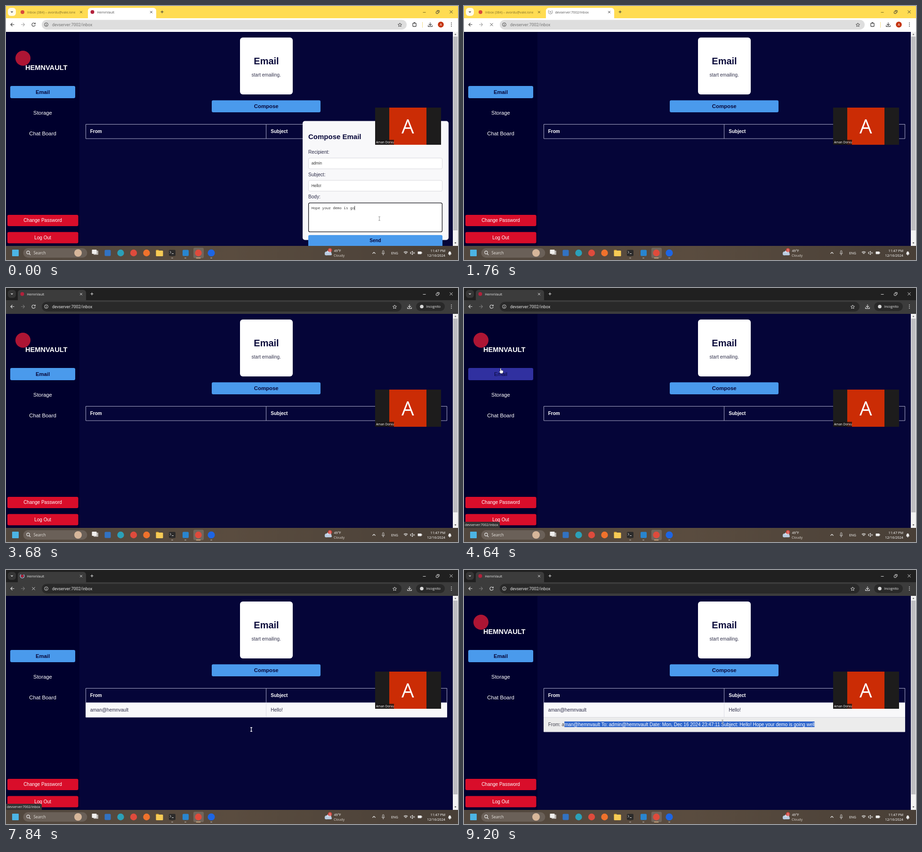
An HTML page with a canvas that plays this animation: 960x540 px, repeating every 9360 ms.

```html
<!DOCTYPE html>
<html lang="en">
<head>
<meta charset="utf-8">
<title>Webmail demo</title>
<style>
html, body { margin: 0; width: 100%; height: 100%; overflow: hidden; background: #050538; }
canvas { display: block; }
</style>
</head>
<body>
<canvas id="stage" width="960" height="540"></canvas>
<script>
const ctx = document.getElementById('stage').getContext('2d');
const LOOP = 9360, STEP = 80;
const SANS = '"Liberation Sans", sans-serif';
const UI = '"Open Sans", sans-serif';
const URL_FONT = 'Roboto, sans-serif';
const MONO = '"Noto Sans Mono", monospace';
const NAVY = '#050538', INK = '#08083a', BLUE = '#4a9aec', RED = '#d90d2a', PAPER = '#f8f8fa';
const ADDRESS = 'devserver:7002/inbox', BRAND = 'HemnVault', USER = 'Aman Dorvu';
const BODY = 'Hope your demo is going well ';
const MAIL = 'From: aman@hemnvault To: admin@hemnvault Date: Mon, Dec 16 2024 23:47:11 Subject: Hello! ' + BODY.trim();

// Moments of the hard changes, in ms
const SENT = 1280, SWITCH = 3520, HOVER = 4080, RELOAD = 4720, ROW = 4800, LOADED = 8000, OPEN = 8000;

// time, x, y, pointer shape from that time on
const POINTER = [
  [0, 793, 452, 'beam'], [320, 793, 452, ''], [800, 787, 496, 'hand'], [880, 788, 499, 'hand'],
  [SENT, 788, 499, ''], [3760, 420, 330, 'arrow'], [HOVER, 79, 186, 'hand'], [4320, 79, 186, 'hand'],
  [4400, 79, 176, 'hand'], [5440, 79, 176, 'arrow'], [5760, 691, 419, 'arrow'], [6240, 691, 419, 'arrow'],
  [6400, 297, 292, 'arrow'], [6960, 297, 292, 'arrow'], [7040, 430, 358, 'arrow'], [7200, 430, 358, 'arrow'],
  [7440, 521, 339, 'beam'], [7920, 521, 339, 'beam'], [8160, 213, 328, 'beam'], [8240, 213, 328, 'beam'],
  [8640, 760, 336, 'beam'], [8800, 760, 336, 'beam'], [9120, 549, 323, 'beam'], [LOOP, 549, 323, 'beam']
];

function box(x, y, w, h, fill, r = 0, line, width = 1) {
  ctx.beginPath();
  ctx.roundRect(x, y, w, h, r);
  if (fill) { ctx.fillStyle = fill; ctx.fill(); }
  if (line) { ctx.strokeStyle = line; ctx.lineWidth = width; ctx.stroke(); }
}
function dot(x, y, r, fill) { box(x - r, y - r, 2 * r, 2 * r, fill, r); }
function ring(x, y, r, color, width = 1) { box(x - r, y - r, 2 * r, 2 * r, null, r, color, width); }
function text(s, x, y, size, color, { bold = false, align = 'left', font = SANS } = {}) {
  ctx.font = `${bold ? 'bold ' : ''}${size}px ${font}`;
  ctx.textAlign = align;
  ctx.fillStyle = color;
  ctx.fillText(s, x, y);
  return ctx.measureText(s).width;
}
function label(s, x, y, size, color, bold) { text(s, x, y, size, color, { bold, align: 'center' }); }
function line(d, color, width = 1, x = 0, y = 0) {
  ctx.save();
  ctx.translate(x, y);
  ctx.strokeStyle = color;
  ctx.lineWidth = width;
  ctx.stroke(new Path2D(d));
  ctx.restore();
}
function shape(d, fill, outline, x, y) {
  ctx.save();
  ctx.translate(x, y);
  ctx.fillStyle = fill;
  ctx.strokeStyle = outline;
  ctx.lineWidth = 1;
  const p = new Path2D(d);
  ctx.stroke(p);
  ctx.fill(p);
  ctx.restore();
}
function cross(x, y, r, color) {
  line(`M${-r} ${-r}L${r} ${r}M${r} ${-r}L${-r} ${r}`, color, 1, x, y);
}

function spinner(x, y, color) {
  ctx.beginPath();
  ctx.arc(x, y, 4.3, -0.8, 4);
  ctx.strokeStyle = color;
  ctx.lineWidth = 1.2;
  ctx.stroke();
}

function tabs(dark, loading) {
  const ink = dark ? '#e6e6e6' : '#333', bar = dark ? '#3c3c3c' : '#fff';
  box(0, 0, 960, 27, dark ? '#202020' : '#ffdc52');
  box(4, 4, 17, 17, dark ? '#363636' : '#fffbea', 6);
  line('M-2 -1L0 1L2 -1', ink, 1.2, 12.5, 12.5);
  const left = dark ? 25 : 174, right = dark ? 170 : 319;
  box(left, 4, right - left, 26, bar, [6, 6, 0, 0]);
  if (!dark) {
    dot(35, 13, 4, '#d94a3c');
    text('Inbox (384) – avordu@vale.ione', 45, 15.7, 7.1, '#80702c', { font: UI });
    box(147, 5, 8, 18, '#ffdc52');
    cross(159.5, 13, 2.3, '#5c5020');
  }
  const icon = left + 9.5;
  if (loading && !dark) { spinner(icon, 12.5, '#999'); dot(icon, 12.5, 2, '#bbb'); }
  else dot(icon, 12.8, loading ? 2.8 : 4, '#b2213b');
  if (loading && dark) spinner(icon, 12.8, '#b9d0f6');
  text(loading && !dark ? ADDRESS : BRAND, left + 19.5, 15.7, 7.1, dark ? ink : '#555', { font: UI });
  cross(right - 10.5, 13, 2.3, ink);
  line('M-3 0H3M0 -3V3', ink, 1, right + 12.5, 12.5);
  line('M885.5 13.5H891.5', dark ? '#ddd' : '#796920');
  box(913.5, 11.5, 4.5, 4.5, null, 1, ink);
  line('M915 9.5H920V14', ink);
  cross(945.5, 12.5, 3, ink);
}

function toolbar(dark, loading) {
  const ink = dark ? '#d8d8d8' : '#444', faint = dark ? '#777' : '#aaa';
  box(0, 26, 960, 29, dark ? '#3c3c3c' : '#fff');
  box(76, 29.5, dark ? 764 : 775, 20.5, dark ? '#292929' : '#dedede', 10);
  line('M4 0H-3.5M0 -3.5L-3.5 0L0 3.5', ink, 1.2, 13.5, 39.5);
  line('M-4 0H3.5M0 -3.5L3.5 0L0 3.5', faint, 1.2, 36, 39.5);
  if (loading) cross(58.5, 39.5, 3, ink);
  else line('M3 -2A3.6 3.6 0 1 0 3.6 .8M3.7 -4V-1.5H1', ink, 1.2, 58.5, 39.5);
  ring(85.5, 39.5, 3.8, ink);
  line('M0 -.5V2.4M0 -2.2V-1.2', ink, 1, 85.5, 39.5);
  text(ADDRESS, 98, 43, 8.9, dark ? '#e4e4e4' : '#757575', { font: URL_FONT });
  line('M0 -4L1.2 -1.3L4 -1L1.9 .9L2.5 3.7L0 2.2L-2.5 3.7L-1.9 .9L-4 -1L-1.2 -1.3Z', ink, 1, dark ? 825.5 : 836.5, 40);
  line('M0 -4.5V1.5M-3 -1.2L0 1.8L3 -1.2M-4.3 1.5V4.2H4.3V1.5', ink, 1.2, dark ? 857 : 901, 39.5);
  if (dark) {
    box(871, 30, 61, 19, '#292929', 9.5);
    dot(883, 39.5, 3.8, '#d8d8d8');
    text('Incognito', 892.5, 42.2, 7, '#eee', { font: UI });
  } else {
    box(864, 36.5, 7, 7, null, 1, ink, 1.3);
    box(866, 34.5, 3, 2, ink, 1);
    line('M884.5 34V46', '#f2dc88');
    dot(923.5, 39.5, 6.2, '#c4320b');
    label('A', 923.5, 42, 7, '#fff');
  }
  for (const y of [36, 39.5, 43]) dot(946, y, 0.9, ink);
}

function sidebar(t, loading) {
  box(0, 55, 156, 455, '#00002d');
  if (!loading) {
    dot(36, 111, 16, '#ad1534');
    text(BRAND.toUpperCase(), 41, 135.5, 14.6, '#fff', { bold: true });
  }
  const hovered = t >= HOVER && t < ROW;
  box(9, 170, 138, 26, hovered ? '#3030a0' : BLUE, 3);
  label('Email', 78, 186.5, 11.3, INK, !hovered);
  label('Storage', 78, 230.5, 11.4, '#fff');
  label('Chat Board', 78, 275, 11.4, '#fff');
  box(3, 444, 150.5, 24, RED, 3);
  label('Change Password', 78, 459.3, 10, '#fff');
  box(3, 480.5, 150.5, 24, RED, 3);
  label('Log Out', 78, 496, 10, '#fff');
}

function tableRow(y, fill, border) {
  box(169.5, y + 0.5, 767, 30.5, fill, 0, border);
}

function openedMail(t, pointerX) {
  tableRow(313, '#ececec', '#dcdce0');
  const x = 178.7, y = 331.5;
  const width = text(MAIL, x, y, 10, '#40404e');
  const from = x + ctx.measureText('From: a').width, end = x + width;
  const to = t >= 8640 ? end : Math.min(end, pointerX);
  if (t <= 8240 || to <= from) return;
  ctx.save();
  ctx.beginPath();
  ctx.rect(from, 322, to - from, 12);
  ctx.clip();
  box(from, 322, to - from, 12, '#2f66cc');
  text(MAIL, x, y, 10, '#fff');
  ctx.restore();
}

function page(t, pointerX) {
  box(156, 55, 793, 455, NAVY);
  box(497, 67, 112, 121, '#fff', 6);
  label('Email', 553, 123.7, 20, INK, true);
  label('start emailing.', 552.7, 150.3, 10, '#34344e');
  box(437, 200.5, 231, 25.5, BLUE, 3);
  label('Compose', 552.7, 216.5, 11.4, INK, true);
  tableRow(251, null, '#a9a9c8');
  text('From', 178.7, 269.8, 10, '#fff', { bold: true });
  text('Subject', 562.3, 269.8, 10, '#fff', { bold: true });
  if (t >= ROW) {
    tableRow(282, PAPER, '#e6e6ee');
    text('aman@hemnvault', 178.7, 300.5, 10, '#2c2c48');
    text('Hello!', 562.3, 300.5, 10, '#2c2c48');
    line('M552.5 282V313', '#dedee8');
  }
  line('M552.5 251V282', '#a9a9c8');
  if (t >= OPEN) openedMail(t, pointerX);
  box(949, 55, 11, 455, '#f2f2f2');
  box(950, 65, 9, 412, '#bdbdc0');
  shape('M-1.5 1L0 -1L1.5 1Z', '#777', '#777', 954.5, 60);
  shape('M-1.5 -1L0 1L1.5 -1Z', '#555', '#555', 954.5, 504);
}

function composePanel(t) {
  box(630, 244.5, 310, 253, PAPER, 5);
  text('Compose Email', 642, 283, 15, INK, { bold: true });
  [['Recipient:', 'admin'], ['Subject:', 'Hello!'], ['Body:']].forEach(([name, value], i) => {
    const y = 314 + 47.5 * i;
    text(name, 642, y, 10.1, '#2c2c48');
    if (!value) return;
    box(642.5, y + 9.2, 284, 23, '#fff', 3, '#d9d9de');
    text(value, 648.7, y + 23.2, 8.2, '#333');
  });
  box(642.6, 418.6, 283.8, 61.6, '#fff', 3, '#15151c', 1.3);
  const typed = BODY.slice(0, 20 + Math.floor(Math.min(1, t / 640) * 9));
  const caret = 648.7 + text(typed, 648.7, 432, 7.63, '#333', { font: MONO });
  box(caret, 425, 0.9, 9, '#222');
  box(642, 487, 285, 24, BLUE, [3, 3, 0, 0]);
  label('Send', 784.5, 502, 10, INK, true);
}

function speaker() {
  box(784, 216, 140, 79, '#1d1c1c');
  box(814, 216, 79, 79, '#cb2c05');
  text('A', 853.3, 271.3, 42, '#fff', { align: 'center', font: UI });
  box(784, 284.5, 40, 10.5, 'rgba(25,22,22,.8)');
  text(USER, 786, 291.8, 6.5, '#fff', { font: UI });
}

function taskbar() {
  const shade = ctx.createLinearGradient(0, 0, 960, 0);
  shade.addColorStop(0, '#51473e');
  shade.addColorStop(0.5, '#5a4c3f');
  shade.addColorStop(1, '#483f37');
  box(0, 510, 960, 30, shade);
  box(13, 518, 14, 14, '#4cb4e4', 1);
  box(36.5, 515, 136, 20, '#6a6058', 10);
  ring(47, 524, 3.1, '#eee', 1.1);
  line('M49.3 526.5L52 529.3', '#eee', 1.2);
  text('Search', 58.5, 528.3, 8.3, '#e6e2de', { font: UI });
  dot(153, 525, 8, '#d6b69a');
  box(398, 514, 22, 22, '#71665c', 3);
  box(186, 520, 10, 9, '#b5b0ac', 1);
  box(182.5, 518, 10, 9, '#f1efed', 1);
  box(209.5, 518.5, 13, 13, '#3272c2', 2);
  dot(243.5, 525, 7.2, '#2ba0b8');
  dot(271, 525, 7.2, '#df4b3c');
  dot(298.5, 525, 7.2, '#f0722c');
  box(318.5, 518.5, 6, 4, '#dba52e', 1);
  box(318.5, 520, 15, 12, '#f8cb55', 1.5);
  box(346, 518.5, 14, 13, '#2b2a2a', 2);
  line('M348 521L350.5 523.5L348 526M352 526.5H356', '#ddd');
  box(375, 518.5, 13, 13, '#2985cf', 2);
  dot(408.5, 525, 7.2, '#df4b3c');
  dot(436, 525, 7.6, '#1d65e4');
  for (const x of [353, 381, 436]) box(x - 2, 535, 4, 1.5, '#aaa39c', 1);
  box(403.5, 535, 10, 1.5, '#e3b98b', 1);

  dot(681, 526, 4.2, '#b9cbe0');
  dot(686, 524, 4.8, '#cfdcec');
  box(677, 525, 15, 5, '#b9cbe0', 2.5);
  dot(688, 519, 4.3, '#d44a43');
  label('1', 688, 521.5, 6.5, '#fff');
  text('49°F', 696.5, 522.7, 7.2, '#fff', { font: UI });
  text('Cloudy', 696, 532.6, 7.2, '#dcd6d0', { font: UI });
  line('M-3 1.5L0 -1.5L3 1.5', '#eee', 1.2, 781.5, 525);
  box(799.7, 520, 3, 6, null, 1.5, '#ddd', 0.9);
  line('M798 525Q801.2 530 804.4 525M801.2 528V530', '#ddd', 0.9);
  text('ENG', 818, 528, 7.3, '#fff', { font: UI });
  for (const r of [2, 4, 6]) {
    ctx.beginPath();
    ctx.arc(849, 528, r, -2.35, -0.8);
    ctx.strokeStyle = '#eee';
    ctx.lineWidth = 1.1;
    ctx.stroke();
  }
  line('M859 523.5H861L863.5 521V529L861 526.5H859Z', '#eee');
  cross(866.5, 525, 1.6, '#eee');
  box(874.5, 522, 8, 5.5, '#eee', 1);
  box(882.5, 523.5, 1.2, 2.5, '#eee');
  text('11:47 PM', 933, 522.7, 7.3, '#fff', { align: 'right', font: UI });
  text('12/16/2024', 933, 532.6, 7.3, '#fff', { align: 'right', font: UI });
  shape('M-3 2L-2.2 0V-2Q0 -5 2.2 -2V0L3 2Z', '#eee', '#eee', 942.5, 525.5);
  dot(942.5, 529, 1.2, '#eee');
}

function pointerAt(t) {
  let i = POINTER.length - 2;
  while (POINTER[i][0] > t) i--;
  const [t0, x0, y0, kind] = POINTER[i], [t1, x1, y1] = POINTER[i + 1];
  const k = (t - t0) / (t1 - t0);
  return { x: x0 + (x1 - x0) * k, y: y0 + (y1 - y0) * k, kind };
}

function drawPointer({ x, y, kind }, t) {
  if (kind === 'beam') {
    const onDark = t >= SWITCH && t < OPEN;
    line('M-2 -4H2M0 -4V4M-2 4H2', onDark ? '#fff' : '#888', onDark ? 1.3 : 0.9, x, y);
  } else if (kind === 'hand') {
    shape('M-2 -5H-.5V-1L4 0V3L2.5 5.5H-1.5L-4 1.5L-2 1Z', '#fff', '#222', x, y);
  } else if (kind === 'arrow') {
    shape('M0 0V8L2 6.2L3.4 9.2L4.7 8.6L3.4 5.7H6Z', '#fff', '#222', x, y);
  }
}

function draw(t) {
  const dark = t >= SWITCH;
  const loading = dark ? t >= RELOAD && t < LOADED : t >= SENT;
  const pointer = pointerAt(t);
  tabs(dark, loading);
  toolbar(dark, loading);
  page(t, pointer.x);
  sidebar(t, loading);
  if (t < SENT) composePanel(t);
  if (t >= HOVER && t < LOADED) {
    box(0, 497, 76, 13, '#333', [0, 3, 0, 0]);
    text(ADDRESS, 2, 506, 7, '#eee', { font: UI });
  }
  taskbar();
  speaker();
  drawPointer(pointer, t);
}

function tick(now) {
  draw(Math.floor((now % LOOP) / STEP) * STEP);
  requestAnimationFrame(tick);
}
draw(0);
requestAnimationFrame(tick);
</script>
</body>
</html>
```
